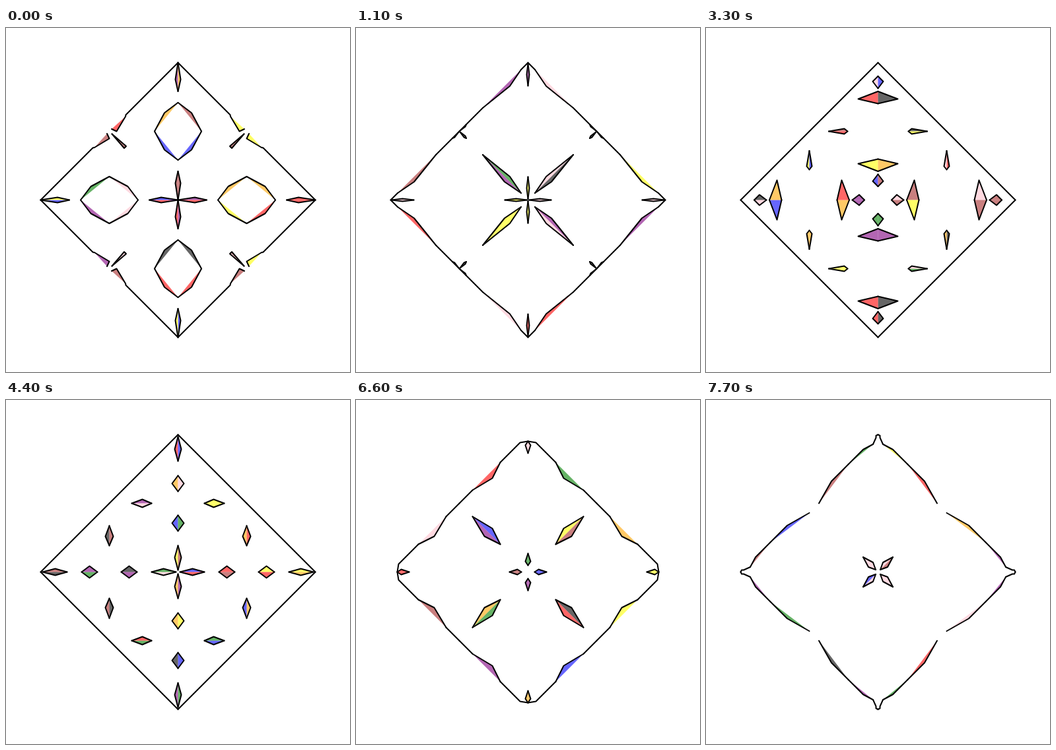
These frames come from a looping animation (521 px wide and 521 px high, 8000 ms). An HTML page with a canvas:

```html
<!DOCTYPE html>
<html lang="en">
<head>
<meta charset="utf-8">
<title>Paper snowflakes</title>
<style>
  html, body { margin: 0; width: 100%; height: 100%; overflow: hidden; background: #fff; }
  canvas { display: block; }
</style>
</head>
<body>
<canvas id="stage" width="521" height="521"></canvas>
<script>
const ctx = document.getElementById("stage").getContext("2d");
const CENTER = 260.5, RADIUS = 208, HOLD = 1100, LOOP = 8000;
const COLORS = {
  r: "red", o: "orange", y: "yellow", g: "green", b: "blue",
  p: "purple", k: "black", i: "pink", n: "brown"
};

// The sheet is folded into 16 triangles: an inner and an outer ring of 8.
// In a triangle, u runs along the axis (0..104) and v across it (0..u).
// Colours go clockwise, starting on the left of the top axis.
const cut = (points, outer, inner) => ({
  points: points.split(" ").map(p => p.split(",").map(Number)), outer, inner
});
const BARE = "--------";
const edge = points => cut(points, BARE, "");
const fullEdge = edge("0,0 104,104");

const scenes = [
  [
    edge("0,0 79,79 81.5,79.5"),
    cut("81.5,79.5 104,93 100.5,100.5", "ryyynnpn", ""),
    cut("100,100 81.5,78.5 80,80", "", "nnnniiin"),
    cut("0,0 25.5,4 43.5,0", "porrbyby", "nnprprrb"),
    cut("60.5,0 76,20.5 104,35.5", "onorrrpg", "bboykkii")
  ],
  [
    edge("0,0 10.5,10.5"),
    edge("68.5,68.5 104,104"),
    cut("10.5,10.5 35.5,27.5 68.5,68.5", "piyprirn", "gikpiyyp"),
    cut("103.5,103.5 97,95 93.5,93.5", "kkkkkkkk", "kkkkkkkk"),
    cut("1.5,0 18,2 35,0", "ppiirrii", "yyiiyyyy")
  ],
  [
    edge("0,0 89,89"),
    cut("86,86 89,89 104,85.5", "rgkgykro", ""),
    edge("0,0 58,0"),
    cut("0,0 58,0 63,5 68.5,0", "rrgkyyoo", "yoyoriii"),
    cut("104,58.5 98,15.5 104,10.5", "gogkkgoi", "gibygnrk")
  ],
  [
    fullEdge,
    cut("20.5,0 28.5,8 39,0", "ibnnkrik", "bninggpp"),
    cut("43.5,0 55,30 62,0", "rkinkrbo", "yonyppor"),
    cut("104,74.5 100,51 104,46", "nkrkgyoy", "ryioiyob")
  ],
  [
    fullEdge,
    cut("3,0 22,5 40,0", "rbyogpkn", "ynbrpoig"),
    cut("62,0 74,9 86,0", "oiyrbkgp", "bgrnyopk"),
    cut("104,70 98,54 104,40", "pyrobgnk", "iyobgrkn")
  ],
  [
    fullEdge,
    edge("20.5,0 22,4 24,6"),
    cut("20.5,0 22,4 24,6", BARE, BARE),
    cut("24,6 36,8 87,0", "borrrbby", "gyrobror"),
    cut("104,77.5 102,72 104,69.5", "nbrygyyg", "okpgyyky")
  ],
  [
    edge("10,0 12,12 42,42"),
    cut("42,42 66,54 84,84", "rgoybpni", "bynkrgop"),
    edge("84,84 104,104"),
    cut("10,0 16,4 28,0", "iiyyoorr", "ggbbppnn")
  ],
  [
    edge("0,0 1.5,3 4.5,3 14.5,7.5"),
    cut("14.5,7.5 22.5,22.5 45,45", "gyppgppn", ""),
    cut("45,45 70.5,70.5 104,89.5", "nroirkgb", ""),
    cut("3.5,3.5 14.5,7.5 22.5,22.5", "", "iiniiibi")
  ]
];

function drawRing(points, colors, isOuter) {
  [...colors].forEach((color, copy) => {
    const side = copy % 2 ? 1 : -1;
    ctx.save();
    ctx.translate(CENTER, CENTER);
    ctx.rotate(Math.floor(copy / 2) * Math.PI / 2);
    ctx.beginPath();
    for (const [u, v] of points) ctx.lineTo(side * v, -(isOuter ? RADIUS - u : u));
    if (color !== "-") {
      ctx.globalAlpha = 0.6;
      ctx.fillStyle = COLORS[color];
      ctx.fill();
      ctx.globalAlpha = 1;
    }
    ctx.stroke();
    ctx.restore();
  });
}

function drawScene(index) {
  ctx.fillStyle = "#fff";
  ctx.fillRect(0, 0, 521, 521);
  ctx.lineWidth = 2;
  ctx.lineCap = ctx.lineJoin = "round";
  for (const { points, outer, inner } of scenes[index]) {
    drawRing(points, outer, true);
    drawRing(points, inner, false);
  }
}

const start = performance.now();
let shown = -1;
function tick() {
  const index = Math.floor((performance.now() - start) % LOOP / HOLD);
  if (index !== shown) drawScene(shown = index);
  requestAnimationFrame(tick);
}
tick();
</script>
</body>
</html>
```
